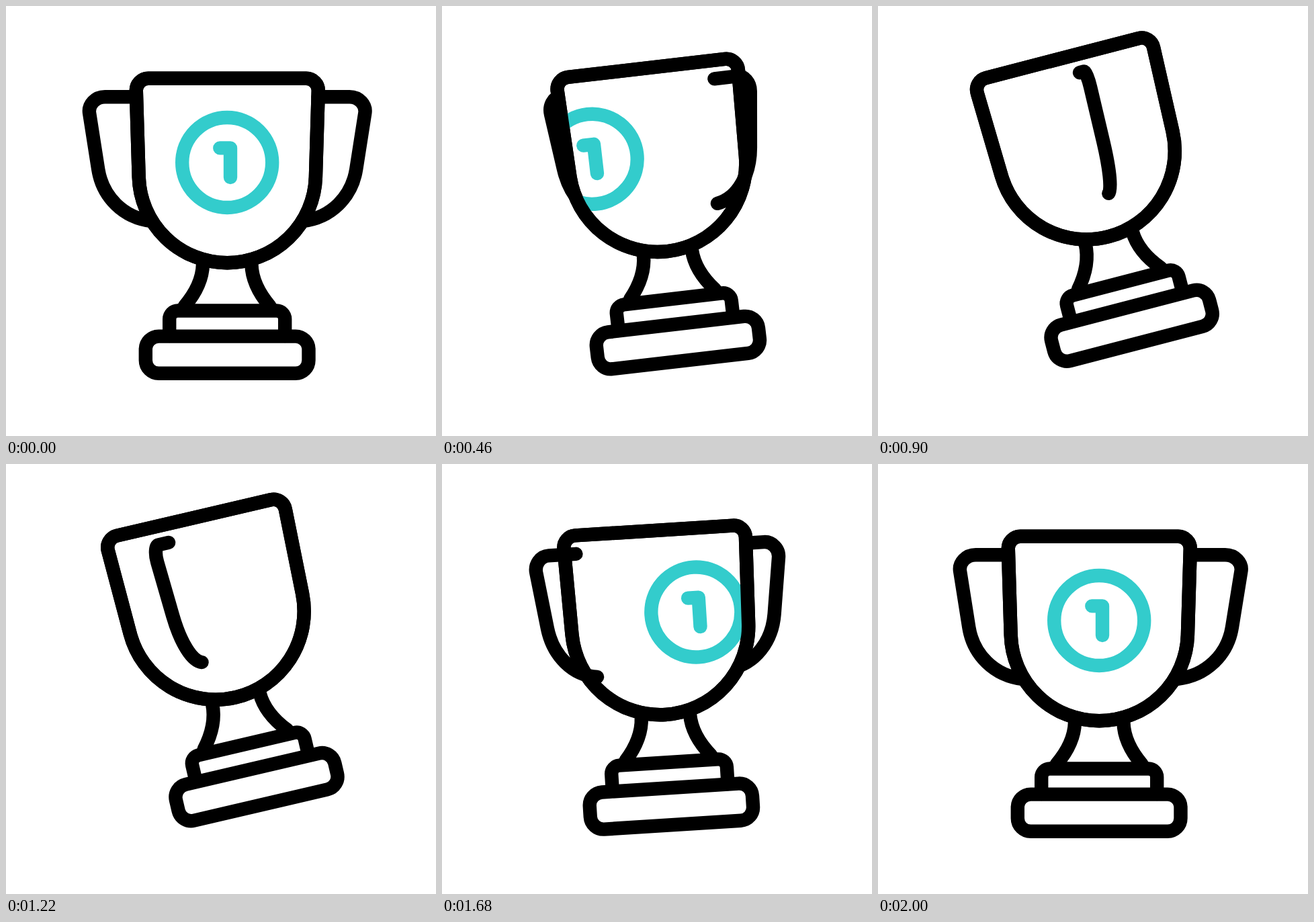
Recreate the animation shown at these times as an HTML page. Size 640 by 640 pixels, loop 2020 ms.

```html
<!DOCTYPE html>
<html lang="en">
<head>
<meta charset="utf-8">
<title>Trophy</title>
<style>
  html, body { margin: 0; width: 100%; height: 100%; overflow: hidden; background: #fff; }
  svg { display: block; width: 100%; height: 100%; }
  .line { fill: none; stroke: #000; stroke-width: 20.4; stroke-linecap: round; stroke-linejoin: round; }
  .teal { stroke: #3cc; }
</style>
</head>
<body>
<svg viewBox="0 0 640 640">
  <defs>
    <path id="bowl" d="M193.8 126.5A18 18 0 0 1 211.8 107.8H446.8A18 18 0 0 1 464.8 126.5L460.9 254.6A131.66 131.66 0 0 1 197.7 254.6Z"/>
    <path id="stem" d="M293 384C292.5 408 280 430 265.5 447"/>
    <clipPath id="inside"><use href="#bowl"/></clipPath>
  </defs>
  <g id="trophy" class="line">
    <path id="back"/>
    <use href="#stem"/>
    <use href="#stem" transform="matrix(-1 0 0 1 658.4 0)"/>
    <path d="M243.2 491V466A12.5 12.5 0 0 1 255.7 453.5H402.7A12.5 12.5 0 0 1 415.2 466V491"/>
    <rect x="207.8" y="491.6" width="242.7" height="55.2" rx="19.5"/>
    <use href="#bowl" fill="#fff"/>
    <g clip-path="url(#inside)">
      <g id="medal" class="teal">
        <circle cx="329.2" cy="233" r="67"/>
        <path d="M318.3 211.4H334V255"/>
      </g>
    </g>
    <use href="#bowl"/>
    <path id="front"/>
  </g>
</svg>
<script>
  const LOOP = 2020, END = 2000, AXIS = 329.2;
  const $ = id => document.getElementById(id);
  const ease = x => x * x * (3 - 2 * x);
  const mix = (a, b, u) => a + (b - a) * u;

  // side: 1 = handle on the right, 0 = seen edge-on, -1 = on the left
  function handle(side) {
    const x = reach => AXIS + reach * side;
    return `M${x(135.3)} 135.2H${x(182)}C${x(196.3)} 135.2 ${x(207.3)} 147 ${x(205)} 160
      L${x(192)} 243C${x(185.5)} 284 ${x(154.5)} 315.5 ${x(112.3)} 320`;
  }

  function draw(ms) {
    const t = Math.min(ms, END) / 1000;
    const tilt = ease(t < 1 ? t : 2 - t);
    const turn = ease(t / 2);
    const slide = tilt * (t < 1 ? -217 : 228);
    $('trophy').setAttribute('transform',
      `translate(${-1.4 * tilt} ${-35.7 * tilt}) rotate(${-15 * tilt} 320 320)`);
    $('medal').setAttribute('transform', `translate(${slide} 0)`);
    $('front').setAttribute('d', handle(mix(1, -1.01, turn)));
    $('back').setAttribute('d', handle(mix(-1, 1.03, turn)));
  }

  let start;
  function tick(now) {
    start ??= now;
    draw((now - start) % LOOP);
    requestAnimationFrame(tick);
  }
  draw(0);
  requestAnimationFrame(tick);
</script>
</body>
</html>
```
